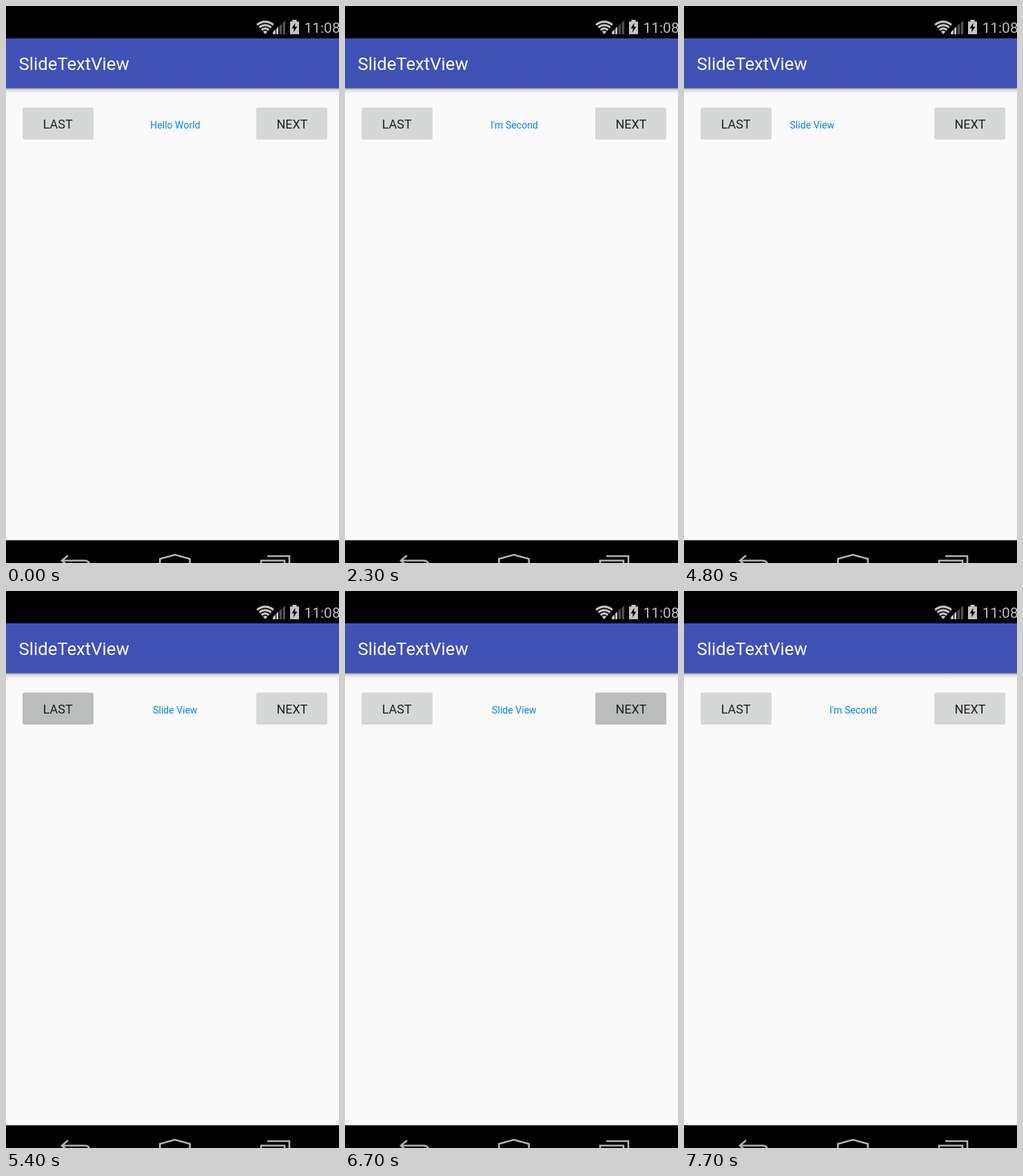
Recreate the animation shown at these times as an HTML page. Size 483x809 px, loop 8.2 s.

```html
<!DOCTYPE html>
<html>
<head>
<meta charset="utf-8">
<title>SlideTextView</title>
<style>
html, body { margin: 0; width: 100%; height: 100%; overflow: hidden; background: #000; }
svg { display: block; width: 483px; height: 809px; font-family: Roboto, sans-serif; }
.label { font-size: 18px; fill: #1f1f1f; text-anchor: middle; }
.slide { font-size: 14.1px; fill: #0080ff; text-anchor: middle; }
.nav { fill: none; stroke: #b4b4b4; stroke-width: 2.6; }
</style>
</head>
<body>
<svg viewBox="0 0 483 809">
  <defs>
    <linearGradient id="shade" x2="0" y2="1">
      <stop offset="0" stop-opacity=".36"/>
      <stop offset=".3" stop-opacity=".12"/>
      <stop offset="1" stop-opacity="0"/>
    </linearGradient>
    <clipPath id="view"><rect x="132" y="150" width="226" height="44"/></clipPath>
    <clipPath id="fan"><path d="M376 41L362 25V19H390V25Z"/></clipPath>
  </defs>
  <rect width="483" height="809"/>
  <rect y="47" width="483" height="729" fill="#fafafa"/>
  <rect y="47" width="483" height="72.5" fill="#3f51b5"/>
  <rect y="119.5" width="483" height="8" fill="url(#shade)"/>
  <text x="18.5" y="93" font-size="25.7" fill="#fff">SlideTextView</text>

  <!-- status bar -->
  <g fill="none" stroke="#c4c4c4" stroke-width="3.2" clip-path="url(#fan)">
    <circle cx="376" cy="40" r="17.2"/>
    <circle cx="376" cy="40" r="12.2"/>
    <circle cx="376" cy="40" r="7.4"/>
    <circle cx="376" cy="40" r="2" stroke-width="4"/>
  </g>
  <path d="M387 41V38L391 34V41Z" fill="#c4c4c4"/>
  <path d="M392 41V33L395 30V41Z" fill="#c4c4c4"/>
  <path d="M396.5 41V29L400 25.5V41ZM401.5 41V24.5L405 21V41Z" fill="#505050"/>
  <path d="M412 22.5H415.500V20H421.500V22.5H425V41H412Z" fill="#c4c4c4"/>
  <path d="M419.500 24.500L414.500 32.500H417.800L416.800 38.500L422.500 30H419Z" fill="#000"/>
  <text x="432.400" y="39" font-size="21" fill="#bebebe">11:08</text>

  <!-- buttons -->
  <rect id="last" x="24" y="147.5" width="103" height="46.5" rx="2.5"/>
  <rect id="next" x="363" y="147.5" width="103" height="46.5" rx="2.5"/>
  <text class="label" x="75.2" y="178">LAST</text>
  <text class="label" x="415" y="178">NEXT</text>

  <g clip-path="url(#view)">
    <text class="slide" id="leaving" y="178"/>
    <text class="slide" id="entering" y="178"/>
  </g>

  <!-- navigation bar -->
  <path class="nav" d="M90 798L81 805.500L90 813M81 805.500H114Q120.500 805.500 121 811"/>
  <path class="nav" d="M223.300 811V803L245 797L266.700 803V811"/>
  <path class="nav" d="M379 799H411V811M370 811V805.500H404V811"/>
</svg>
<script>
const LOOP = 8200, TICK = 100, DURATION = 800, CENTER = 245.4, WIDTH = 228;
const SECOND = "I'm Second", SLIDE = "Slide View";
// dir -1 slides left (next), 1 slides right (last)
const moves = [
  { at: 1510, dir: -1, text: SECOND },
  { at: 2810, dir: -1, text: SECOND },
  { at: 4409, dir: 1, text: SLIDE },
  { at: 5608, dir: 1, text: SLIDE },
  { at: 6866, dir: -1, text: SECOND }
];
const presses = { last: [4200, 5400], next: [6700] };
const $ = id => document.getElementById(id);
const decelerate = p => 1 - (1 - p) ** 2;

function place(id, text, x) {
  $(id).textContent = text;
  $(id).setAttribute("x", x);
}

function draw(now) {
  const t = Math.floor(now % LOOP / TICK) * TICK;
  let from = "", current = { at: -DURATION, dir: -1, text: "Hello World" };
  for (const move of moves) {
    if (t < move.at) break;
    from = current.text;
    current = move;
  }
  const p = decelerate(Math.min(1, (t - current.at) / DURATION));
  place("leaving", p < 1 ? from : "", CENTER + current.dir * WIDTH * p);
  place("entering", current.text, CENTER - current.dir * WIDTH * (1 - p));
  for (const id in presses) {
    const down = presses[id].some(at => t >= at && t < at + TICK);
    $(id).setAttribute("fill", down ? "#bcbdbd" : "#d6d7d7");
  }
}

const start = performance.now();
function frame() {
  draw(performance.now() - start);
  requestAnimationFrame(frame);
}
frame();
</script>
</body>
</html>
```
